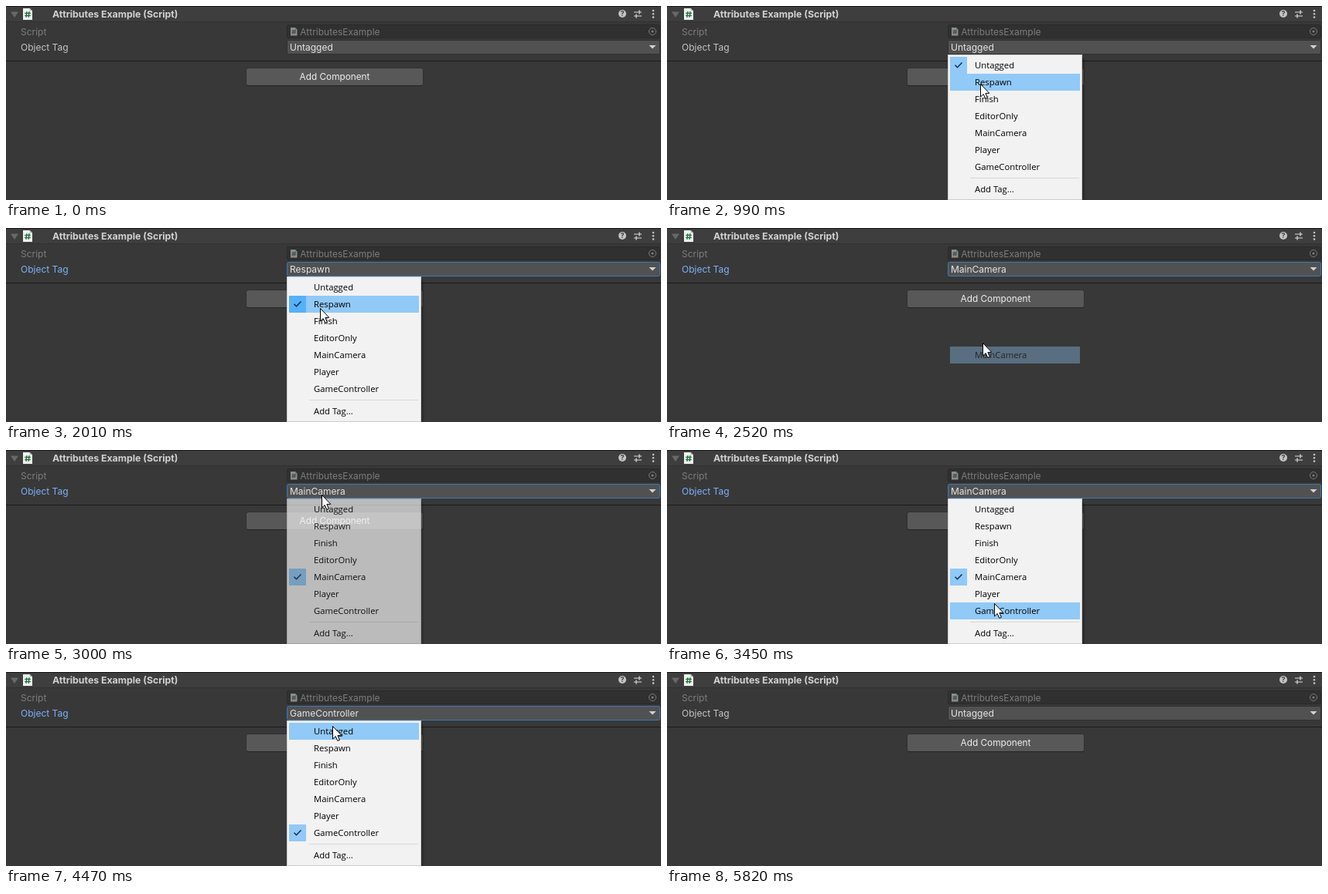
These frames come from a looping animation (847 by 252 pixels, 5940 ms). An HTML page with a canvas:

```html
<!DOCTYPE html>
<html lang="en">
<head>
<meta charset="utf-8">
<title>Tag dropdown</title>
<style>
html, body { margin: 0; width: 100%; height: 100%; overflow: hidden; background: #383838; }
canvas { display: block; width: 847px; height: 252px; }
</style>
</head>
<body>
<canvas id="stage" width="847" height="252"></canvas>
<script>
const LOOP = 5940, STEP = 30;
const UI = '12px Inter, sans-serif';
const UI_BOLD = 'bold 12.3px Inter, sans-serif';
const UI_BUTTON = '11.8px Inter, sans-serif';
const MENU_FONT = '500 11.3px "Open Sans", sans-serif';
const TAGS = ['Untagged', 'Respawn', 'Finish', 'EditorOnly', 'MainCamera', 'Player', 'GameController'];
const MENU = { x: 363, y: 63, w: 174, h: 189, top: 66, row: 22 };

// Each pick: menu opens, a row is clicked, the value changes.
const PICKS = [
  { open: 690, close: 1290, from: 0, to: 1 },
  { open: 1740, close: 2370, from: 1, to: 4 },
  { open: 2970, close: 3630, from: 4, to: 6 },
  { open: 4230, close: 5070, from: 6, to: 0 }
];
const FOCUS = [1290, 5820];
const POINTER = [90, 4920];

// Pointer path: time, x, y
const PATH = [
  [60, 862, 30], [330, 560, 40], [600, 407, 51], [690, 407, 51], [810, 406, 63],
  [990, 405, 101], [1320, 405, 101], [1560, 407, 56], [1740, 407, 56], [1860, 406, 68],
  [2010, 406, 104], [2220, 408, 162], [2430, 408, 162], [2700, 409, 95], [2940, 408, 55],
  [3000, 408, 58], [3240, 414, 130], [3510, 424, 206], [3660, 424, 206], [3960, 425, 80],
  [4200, 424, 53], [4230, 424, 53], [4470, 422, 70]
];

const stage = document.getElementById('stage').getContext('2d');
const menuLayer = document.createElement('canvas');
menuLayer.width = 847;
menuLayer.height = 252;
const layer = menuLayer.getContext('2d');

const clamp = v => Math.max(0, Math.min(1, v));

function box(c, x, y, w, h, color) {
  c.fillStyle = color;
  c.fillRect(x, y, w, h);
}

function text(c, str, x, y, color, font = UI, align = 'left') {
  c.font = font;
  c.fillStyle = color;
  c.textAlign = align;
  c.fillText(str, x, y);
}

function trace(c, pts, close) {
  c.beginPath();
  pts.forEach(([x, y]) => c.lineTo(x, y));
  if (close) c.closePath();
}

function poly(c, pts, color) {
  trace(c, pts, true);
  c.fillStyle = color;
  c.fill();
}

function line(c, pts, color, width) {
  trace(c, pts, false);
  c.strokeStyle = color;
  c.lineWidth = width;
  c.stroke();
}

function disc(c, x, y, r, color) {
  c.beginPath();
  c.arc(x, y, r, 0, Math.PI * 2);
  c.fillStyle = color;
  c.fill();
}

function panel(c, x, y, w, h, r, fill, border) {
  c.beginPath();
  c.roundRect(x + .5, y + .5, w - 1, h - 1, r);
  c.fillStyle = fill;
  c.fill();
  c.strokeStyle = border;
  c.lineWidth = 1;
  c.stroke();
}

// Monotone cubic interpolation along one axis of PATH
function slope(i, k) {
  if (i <= 0 || i >= PATH.length - 1) return 0;
  const rate = j => (PATH[j + 1][k] - PATH[j][k]) / (PATH[j + 1][0] - PATH[j][0]);
  const a = rate(i - 1), b = rate(i);
  return a * b <= 0 ? 0 : 2 * a * b / (a + b);
}

function along(t, k) {
  const last = PATH.length - 1;
  if (t <= PATH[0][0]) return PATH[0][k];
  if (t >= PATH[last][0]) return PATH[last][k];
  let i = 0;
  while (PATH[i + 1][0] <= t) i++;
  const h = PATH[i + 1][0] - PATH[i][0], u = (t - PATH[i][0]) / h, v = 1 - u;
  return (1 + 2 * u) * v * v * PATH[i][k] + u * v * v * h * slope(i, k)
    + u * u * (3 - 2 * u) * PATH[i + 1][k] - u * u * v * h * slope(i + 1, k);
}

function scriptIcon(c, x, y, w, h, paper, ink, fold) {
  const f = w * .28;
  poly(c, [[x, y], [x + w - f, y], [x + w, y + f], [x + w, y + h], [x, y + h]], paper);
  poly(c, [[x + w - f, y], [x + w, y + f], [x + w - f, y + f]], fold);
  const cx = x + w / 2, cy = y + h * .53, s = w * .32, d = w * .13;
  for (const k of [-1, 1]) {
    line(c, [[cx + k * d + .5, cy - s], [cx + k * d - .5, cy + s]], ink, w * .11);
    line(c, [[cx - s, cy + k * d], [cx + s, cy + k * d]], ink, w * .11);
  }
}

function header(c) {
  box(c, 0, 0, 847, 21, '#3e3e3e');
  box(c, 0, 0, 847, 1, '#1a1a1a');
  box(c, 0, 20, 847, 1, '#303030');
  poly(c, [[6, 7.5], [16, 7.5], [11, 15]], '#686868');
  scriptIcon(c, 22, 3, 12, 15, '#f0f0f0', '#1f7038', '#b8b8b8');
  text(c, 'Attributes Example (Script)', 60, 15, '#d2d2d2', UI_BOLD);

  disc(c, 797, 10, 5, '#c4c4c4');
  text(c, '?', 797, 13.3, '#3e3e3e', 'bold 9px Inter, sans-serif', 'center');
  line(c, [[812, 8], [822, 8]], '#c4c4c4', 1.2);
  line(c, [[812, 13], [822, 13]], '#c4c4c4', 1.2);
  line(c, [[819, 5.5], [819, 10.5]], '#c4c4c4', 1.6);
  line(c, [[815, 10.5], [815, 15.5]], '#c4c4c4', 1.6);
  for (const y of [6, 10.3, 14.6]) disc(c, 837, y, 1.3, '#c4c4c4');
}

function scriptRow(c) {
  text(c, 'Script', 19, 38, '#7d7d7d');
  panel(c, 363, 24, 483, 18, 2, '#303030', '#2a2a2a');
  scriptIcon(c, 368, 28, 8.5, 10.5, '#8c8c8c', '#33503f', '#6a6a6a');
  text(c, 'AttributesExample', 380.3, 38, '#7d7d7d');
  c.beginPath();
  c.arc(836, 33, 4.5, 0, Math.PI * 2);
  c.strokeStyle = '#7a7a7a';
  c.lineWidth = 1;
  c.stroke();
  disc(c, 836, 33, 1.6, '#7a7a7a');
}

function tagRow(c, value, focus) {
  text(c, 'Object Tag', 19, 58, focus ? '#7fb0fa' : '#c4c4c4');
  panel(c, 363, 44, 483, 19, 2, '#515151', focus ? '#3a79bb' : '#303030');
  text(c, TAGS[value], 367, 58, '#e4e4e4');
  poly(c, [[831.5, 51], [840.5, 51], [836, 55.5]], '#d2d2d2');
}

function addButton(c, hover) {
  panel(c, 310, 80, 230, 24, 3, hover ? '#676767' : '#585858', '#303030');
  box(c, 312, 103, 226, 1, '#242424');
  text(c, 'Add Component', 425, 96, '#eeeeee', UI_BUTTON, 'center');
}

function menuRow(c, i, active, checked) {
  const y = MENU.top + MENU.row * i;
  if (active) box(c, 366, y, 168, MENU.row, '#91c9f7');
  if (checked) {
    box(c, 366, y, 22, MENU.row, active ? '#56b0fa' : '#91c9f7');
    line(c, [[372.5, y + 10.7], [375.5, y + 13.7], [381.5, y + 7.5]], '#0c2c4c', 1.4);
  }
  text(c, TAGS[i], 398, y + 15, '#000', MENU_FONT);
}

function drawMenu(c, active, checked) {
  c.clearRect(0, 0, 847, 252);
  for (let i = 0; i < 4; i++) box(c, 537 + i, 67 + i, 1, 185, `rgba(0,0,0,${.26 - .06 * i})`);
  box(c, MENU.x, MENU.y, MENU.w, MENU.h, '#cccccc');
  box(c, MENU.x + 1, MENU.y + 1, MENU.w - 2, MENU.h - 2, '#f2f2f2');
  TAGS.forEach((_, i) => menuRow(c, i, i === active, i === checked));
  box(c, 392, 223, 141, 1, '#d7d7d7');
  text(c, 'Add Tag...', 398, 242, '#000', MENU_FONT);
}

function pointer(c, x, y) {
  const shape = [[.5, .5], [.5, 17], [4.2, 13.5], [6.8, 19.4], [9.4, 18.3], [6.9, 12.5], [11.8, 12.3]];
  c.save();
  c.translate(x, y);
  poly(c, shape, '#fff');
  c.strokeStyle = '#000';
  c.lineWidth = 1;
  c.stroke();
  c.restore();
}

function draw(t) {
  const c = stage;
  const x = Math.round(along(t, 1)), y = Math.round(along(t, 2));
  const shown = t >= POINTER[0] && t < POINTER[1];
  const focus = t >= FOCUS[0] && t < FOCUS[1];
  const open = PICKS.find(p => t >= p.open && t < p.close);
  const fading = PICKS.find(p => t >= p.close && t < p.close + 240);
  const value = PICKS.reduce((v, p) => t >= p.close ? p.to : v, 0);

  box(c, 0, 0, 847, 252, '#383838');
  header(c);
  scriptRow(c);
  tagRow(c, value, focus);
  box(c, 0, 71, 847, 1, '#1a1a1a');
  addButton(c, shown && !open && y >= 80 && y < 104);

  if (open) {
    const row = Math.floor((y - MENU.top) / MENU.row);
    drawMenu(layer, row, open.from);
    c.globalAlpha = clamp((t - open.open + STEP) / 85);
    c.drawImage(menuLayer, 0, 0);
  } else if (fading) {
    layer.clearRect(0, 0, 847, 252);
    menuRow(layer, fading.to, true, false);
    c.globalAlpha = clamp(1 - (t - fading.close) / 240);
    c.drawImage(menuLayer, 0, 0);
  }
  c.globalAlpha = 1;
  if (shown) pointer(c, x, y);
}

const start = performance.now();
function tick() {
  const t = (performance.now() - start) % LOOP;
  draw(Math.floor(t / STEP) * STEP);
  requestAnimationFrame(tick);
}
tick();
</script>
</body>
</html>
```
